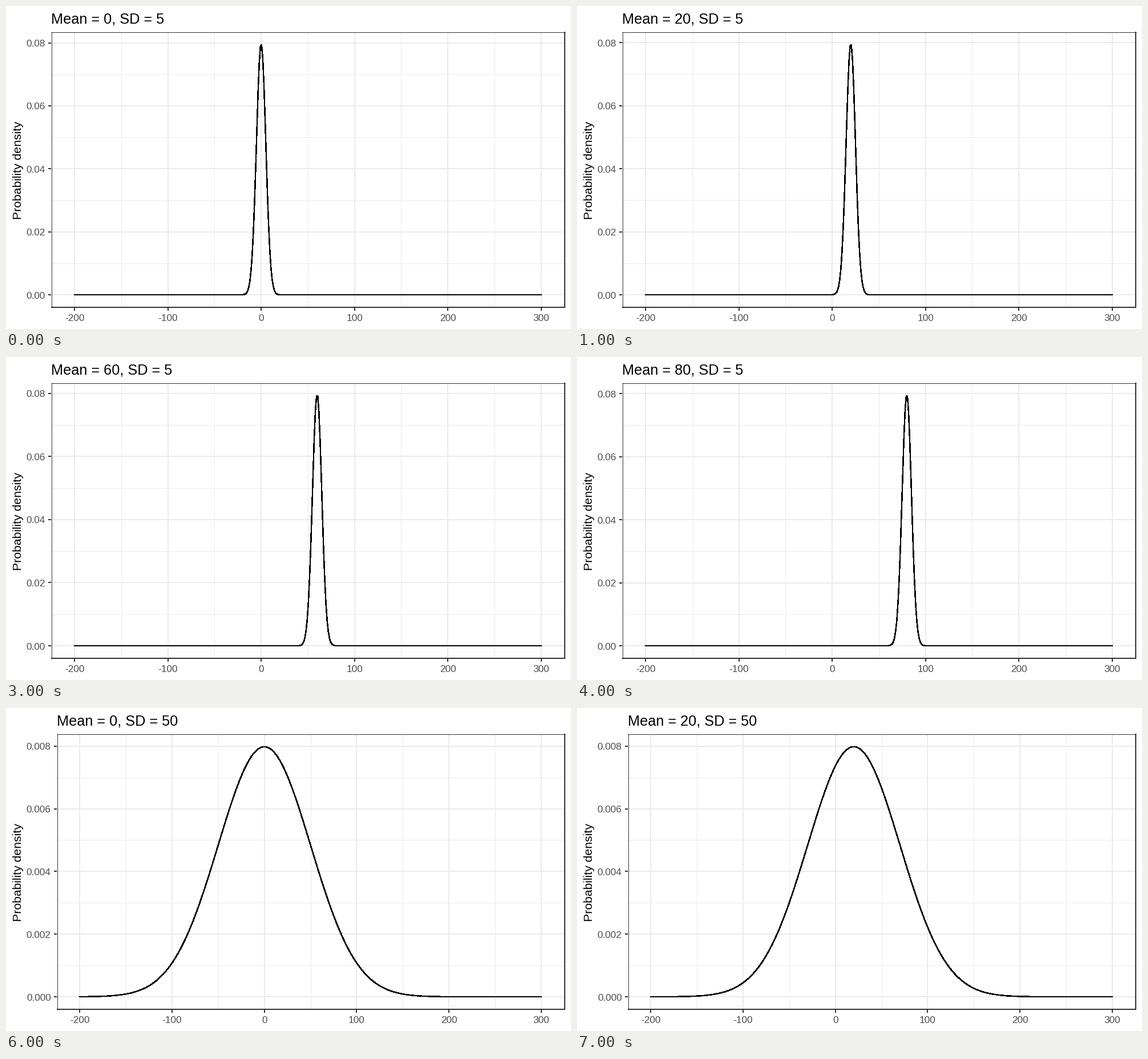
Recreate the animation shown at these times as a matplotlib script. Size 990 by 566 pixels, loop 8 s.

```python
import matplotlib.pyplot as plt
import numpy as np
from matplotlib.animation import FuncAnimation

W, H = 990, 566
TOP, RIGHT, BOTTOM = 46, 978.5, 528
DARK, GRID, LABEL = "#333333", "#ebebeb", "#4d4d4d"

plt.rcParams["font.family"] = "Liberation Sans"

# At 72 dpi one point is one pixel.
fig = plt.figure(figsize=(W / 72, H / 72), dpi=72, facecolor="white")
ax = fig.add_axes([0, 0, 1, 1])

xs = np.linspace(-200, 300, 400)
states = [(mean, 5) for mean in range(0, 101, 20)] + [(0, 50), (20, 50)]


def segment(x, y, color, width):
    ax.plot(x, y, color=color, lw=width, solid_capstyle="butt")


def draw(i):
    mean, sd = states[i]
    left, step, digits = (79.1, 0.02, 2) if sd == 5 else (88.7, 0.002, 3)
    density = np.exp(-0.5 * ((xs - mean) / sd) ** 2) / (sd * np.sqrt(2 * np.pi))
    peak = density.max()

    # The panel extends 5 % past the data on each side.
    def px(x):
        return left + (RIGHT - left) * (x + 225) / 550

    def py(y):
        return BOTTOM - (BOTTOM - TOP) * (y / peak + 0.05) / 1.1

    ax.clear()
    ax.set_xlim(0, W)
    ax.set_ylim(H, 0)
    ax.axis("off")

    x_major = range(-200, 301, 100)
    y_major = step * np.arange(5)
    x_minor = range(-150, 251, 100)
    y_minor = y_major[:4] + step / 2

    for x_lines, y_lines, width in ((x_minor, y_minor, 1), (x_major, y_major, 2)):
        for y in y_lines:
            segment([left, RIGHT], [py(y)] * 2, GRID, width)
        for x in x_lines:
            segment([px(x)] * 2, [TOP, BOTTOM], GRID, width)

    ax.plot(px(xs), py(density), color="black", lw=1.5, antialiased=False)

    # Panel border: thin on the left and top, heavier on the right and bottom
    edge = round(left)
    segment([edge + 0.5] * 2, [45, 529], DARK, 1)
    segment([edge, 980], [45.5] * 2, DARK, 1)
    segment([979] * 2, [45, 529], DARK, 2)
    segment([edge, 980], [BOTTOM] * 2, DARK, 2)

    for x in x_major:
        segment([px(x)] * 2, [BOTTOM, BOTTOM + 6], DARK, 2)
        ax.text(px(x), 552, str(x), size=17.3, color=LABEL,
                ha="center", va="baseline")
    for y in y_major:
        segment([edge - 5, edge], [py(y)] * 2, DARK, 2)
        ax.text(left - 10, py(y) + 6.5, f"{y:.{digits}f}", size=17.3,
                color=LABEL, ha="right", va="baseline")

    ax.text(left, 30, f"Mean = {mean}, SD = {sd}", size=25.3, va="baseline")
    ax.text(27.5, 288, "Probability density", size=21.2, rotation=90,
            rotation_mode="anchor", ha="center", va="baseline")
    return []


anim = FuncAnimation(fig, draw, frames=len(states), init_func=lambda: [],
                     interval=1000, repeat=True, repeat_delay=0, blit=False)
plt.show()
```
